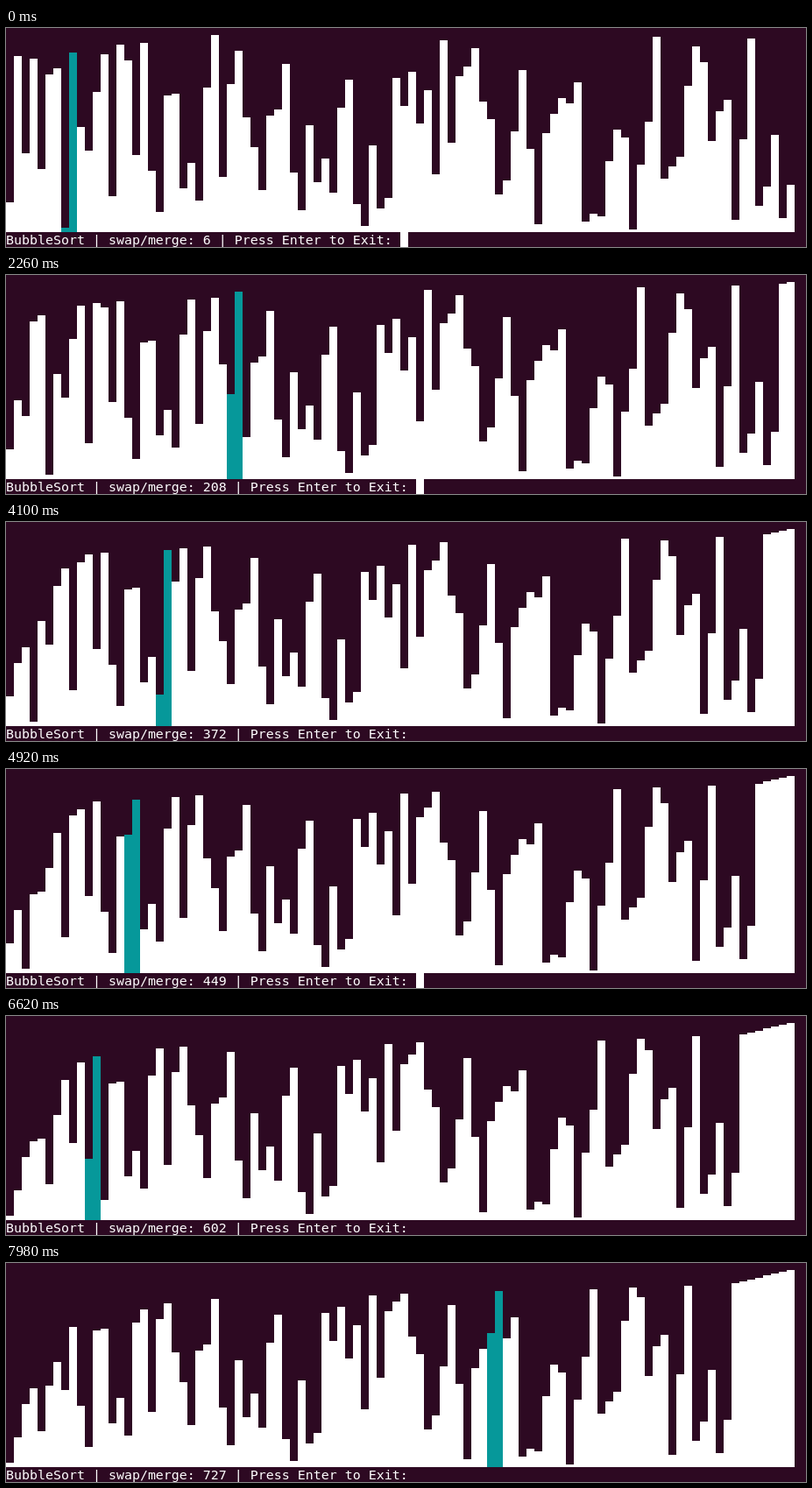
Animation of 913x250 px, one loop 8000 ms. Source, as an HTML page with a canvas:

```html
<!DOCTYPE html>
<html lang="en">
<head>
<meta charset="utf-8">
<title>Bubble sort</title>
<style>
  html, body { margin: 0; height: 100%; overflow: hidden; background: #2d0922; }
  canvas { display: block; }
</style>
</head>
<body>
<canvas id="stage" width="913" height="250"></canvas>
<script>
const ctx = document.getElementById('stage').getContext('2d');
const LOOP = 8000, CELL = 9, FLOOR = 233;
const BACKGROUND = '#2d0922', WHITE = '#fff', TEAL = '#06989a';

// A shuffled 1..100, part way through the first pass.
const START = [
  15, 89, 40, 88, 32, 80, 83, 2, 91, 53, 41, 71, 90, 18, 95, 87, 39, 96, 31, 10,
  69, 70, 22, 35, 16, 73, 100, 28, 75, 92, 58, 43, 21, 59, 62, 85, 30, 11, 54, 25,
  37, 20, 63, 77, 14, 3, 44, 12, 17, 78, 64, 81, 55, 72, 29, 97, 45, 79, 84, 93,
  66, 57, 19, 26, 51, 82, 42, 4, 50, 60, 68, 65, 76, 5, 9, 8, 36, 52, 48, 1,
  34, 56, 99, 27, 33, 38, 74, 94, 86, 46, 61, 67, 6, 47, 98, 13, 23, 49, 7, 24
];
const START_INDEX = 7, START_SWAPS = 6;

// [screen refresh, swaps done]: about three swaps per refresh, with two short stalls.
const PACE = [[0, 6], [25, 81], [26, 81], [39, 121], [98, 299], [99, 302], [100, 302],
              [148, 449], [178, 538], [220, 666], [239, 727]];

function swapsAt(time) {
  // 30 refreshes per second, shown on a 20 ms clock
  const refresh = Math.floor((Math.floor(time / 20) * 20 + 19.9) * 0.03);
  const next = Math.max(1, PACE.findIndex(([r]) => r >= refresh));
  const [r0, s0] = PACE[next - 1], [r1, s1] = PACE[next];
  return Math.round(s0 + (s1 - s0) * (refresh - r0) / (r1 - r0));
}

function sortUntil(target) {
  const values = START.slice();
  let swaps = START_SWAPS, active = START_INDEX, i = active + 1;
  for (let end = values.length - 1; end > 0; end--, i = 0) {
    for (; i < end; i++) {
      if (swaps === target) return { values, active };
      if (values[i] > values[i + 1]) {
        [values[i], values[i + 1]] = [values[i + 1], values[i]];
        active = i;
        swaps++;
      }
    }
  }
  return { values, active };
}

function draw(time) {
  const swaps = swapsAt(time);
  const { values, active } = sortUntil(swaps);

  ctx.fillStyle = BACKGROUND;
  ctx.fillRect(0, 0, 913, 250);

  values.forEach((value, i) => {
    const top = Math.floor(FLOOR - value * 2.25);
    ctx.fillStyle = i === active || i === active + 1 ? TEAL : WHITE;
    ctx.fillRect(i * CELL, top, CELL, FLOOR - top);
  });

  const status = `BubbleSort | swap/merge: ${swaps} | Press Enter to Exit: `;
  ctx.fillStyle = WHITE;
  ctx.font = '14.95px "DejaVu Sans Mono", monospace';
  ctx.fillText(status, 0, 247);

  const cursorOn = (time + 200) % 1200 < 600;
  if (cursorOn) ctx.fillRect(status.length * CELL, FLOOR, CELL, 17);
}

const began = performance.now();
function tick() {
  draw((performance.now() - began) % LOOP);
  requestAnimationFrame(tick);
}
tick();
</script>
</body>
</html>
```
